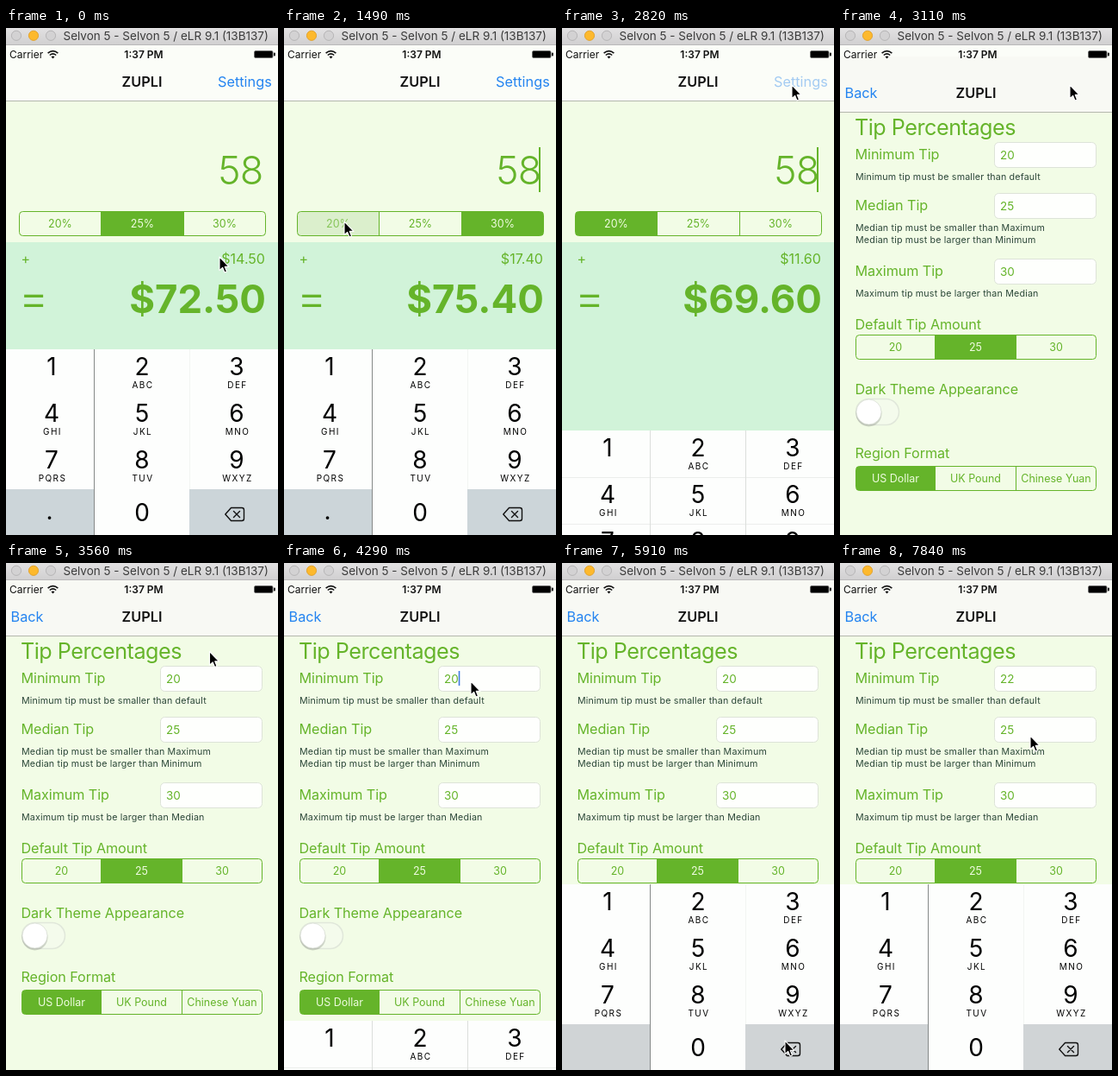
These frames come from a looping animation (316x587 px, 8000 ms). An HTML page:

```html
<!DOCTYPE html>
<html lang="en">
<head>
<meta charset="utf-8">
<title>Tip calculator</title>
<style>
html, body { margin: 0; width: 100%; height: 100%; overflow: hidden; background: #f2fce6; }
svg { display: block; width: 316px; height: 587px; }
text { font-family: Inter, Roboto, sans-serif; white-space: pre; }
</style>
</head>
<body>
<svg id="stage" viewBox="0 0 316 587"></svg>
<script>
const GREEN = '#65b42a', PALE = '#f2fce6', TINT = '#dbefcc', BLUE = '#2484f0', NOTE = '#2b4638';
const LOOP = 8000, STEP = 148;
const stage = document.getElementById('stage');

function el(parent, tag, attrs = {}) {
  const node = document.createElementNS('http://www.w3.org/2000/svg', tag);
  set(node, attrs);
  parent.appendChild(node);
  return node;
}
function set(node, attrs) {
  for (const k in attrs) node.setAttribute(k, attrs[k]);
}
function rect(parent, x, y, width, height, fill, more) {
  return el(parent, 'rect', { x, y, width, height, fill, ...more });
}
function text(parent, x, y, size, str, fill = '#000', more) {
  const node = el(parent, 'text', { x, y, 'font-size': size, fill, ...more });
  node.textContent = str;
  return node;
}
const mid = { 'text-anchor': 'middle' };
const end = { 'text-anchor': 'end' };

// Segmented control; edges are the four vertical borders
let clips = 0;
function segments(parent, edges, y, labels) {
  const box = { x: edges[0], y, width: edges[3] - edges[0], height: 28, rx: 4 };
  const id = 'clip' + clips++;
  el(el(parent, 'clipPath', { id }), 'rect', box);
  const inner = el(parent, 'g', { 'clip-path': `url(#${id})` });
  const cells = labels.map((str, i) => {
    const w = edges[i + 1] - edges[i];
    return {
      back: rect(inner, edges[i], y, w, 28, 'none'),
      label: text(parent, edges[i] + w / 2, y + 18.6, 12.5, str, GREEN, mid)
    };
  });
  el(parent, 'rect', { ...box, fill: 'none', stroke: GREEN });
  el(parent, 'path', { d: `M${edges[1]} ${y}v28M${edges[2]} ${y}v28`, stroke: GREEN });
  return (chosen, pressed) => cells.forEach(({ back, label }, i) => {
    set(back, { fill: i === chosen ? GREEN : i === pressed ? TINT : 'none' });
    set(label, { fill: i === chosen ? '#eefbdf' : i === pressed ? '#86c558' : GREEN });
  });
}

function navBar(parent, fill) {
  rect(parent, 0, 20, 316, 64, fill);
  rect(parent, 0, 84, 316, 1, '#b4b7ae');
  text(parent, 158, 68, 16.3, 'ZUPLI', '#111', { ...mid, 'font-weight': 600 });
}

// Calculator screen
const calc = el(stage, 'g');
rect(calc, 0, 20, 316, 228, PALE);
rect(calc, 0, 248, 316, 339, '#d1f3d9');
navBar(calc, '#fbfdf8');
const settings = text(calc, 246, 68, 16.3, 'Settings', BLUE);
text(calc, 298.5, 181, 45, '58', GREEN, { ...end, 'letter-spacing': -0.8, 'font-weight': 360 });
const caret = rect(calc, 296, 138, 2, 52, GREEN);
const pickTip = segments(calc, [15.5, 110.5, 206.5, 301.5], 212.5, ['20%', '25%', '30%']);
text(calc, 17.5, 273, 16, '+', GREEN);
text(calc, 14.5, 331, 54, '=', GREEN, { 'font-weight': 350 });
const tip = text(calc, 301, 272.5, 16.1, '', GREEN, end);
const total = text(calc, 302, 330, 45.5, '', GREEN, { ...end, 'font-weight': 700 });

// Settings screen
const prefs = el(stage, 'g');
rect(prefs, 0, 20, 316, 567, PALE);
navBar(prefs, '#f8f9f4');
text(prefs, 5.5, 68, 16.3, 'Back', BLUE);
text(prefs, 17, 110.5, 25.2, 'Tip Percentages', GREEN, { 'font-weight': 380, 'letter-spacing': -0.5 });

function heading(y, str) {
  text(prefs, 17.5, y, 16.2, str, GREEN, { 'letter-spacing': -0.08 });
}
function note(y, str) {
  text(prefs, 18, y, 10.7, str, NOTE, { 'letter-spacing': 0.17 });
}
function field(y, name, value, ...notes) {
  heading(y + 20, name);
  rect(prefs, 179.5, y + .5, 118, 29, '#fefffd', { rx: 5, stroke: '#dde3d8' });
  notes.forEach((str, i) => note(y + 44 + i * 14, str));
  return text(prefs, 186, y + 19.5, 13.5, value, GREEN);
}
const least = field(119, 'Minimum Tip', '20', 'Minimum tip must be smaller than default');
field(178, 'Median Tip', '25', 'Median tip must be smaller than Maximum', 'Median tip must be larger than Minimum');
field(254, 'Maximum Tip', '30', 'Maximum tip must be larger than Median');
const fieldCaret = rect(prefs, 202, 125, 1.6, 17, '#3f78e0');
heading(335.5, 'Default Tip Amount');
const thirds = [18.5, 110.5, 204.5, 297.5];
segments(prefs, thirds, 342.5, ['20', '25', '30'])(1);
heading(410.5, 'Dark Theme Appearance');
rect(prefs, 18.5, 416.5, 50, 30, '#f4fbec', { rx: 15, stroke: '#e0e7da', 'stroke-width': 1.5 });
el(prefs, 'circle', { cx: 33.5, cy: 433.5, r: 15, fill: '#000', opacity: .16 });
el(prefs, 'circle', { cx: 33.5, cy: 431.5, r: 14.5, fill: '#fff', stroke: '#d5dad0', 'stroke-width': .7 });
heading(484.5, 'Region Format');
segments(prefs, thirds, 494.5, ['US Dollar', 'UK Pound', 'Chinese Yuan'])(0);

// Number pad
const pad = el(stage, 'g');
rect(pad, 0, 372, 316, 215, '#fdfefd');
const sides = [rect(pad, 0, 534, 102, 53), rect(pad, 213, 534, 103, 53)];
const rows = el(pad, 'path', { d: 'M0 426.5H316M0 480.5H316M0 533.5H316', stroke: '#eceeec' });
const seams = [rect(pad, 102, 372, 1, 215), rect(pad, 213, 372, 1, 162)];
const letters = ['', 'ABC', 'DEF', 'GHI', 'JKL', 'MNO', 'PQRS', 'TUV', 'WXYZ'];
const cols = [53, 158, 268];
letters.forEach((str, i) => {
  const x = cols[i % 3], y = 402 + 54 * Math.floor(i / 3);
  text(pad, x, y, 28, i + 1, '#000', mid);
  text(pad, x + 1, y + 15, 10, str, '#000', { ...mid, 'letter-spacing': 1.4 });
});
text(pad, 158, 571, 28, '0', '#000', mid);
const dot = text(pad, 50.5, 569, 28, '.', '#000', mid);
el(pad, 'path', {
  d: 'M261.5 555.5H274Q276.5 555.5 276.5 558V568Q276.5 570.5 274 570.5H261.5L254.8 563ZM264.5 559.5l7 7M271.5 559.5l-7 7',
  fill: 'none', stroke: '#111', 'stroke-width': 1.4, 'stroke-linejoin': 'round', 'stroke-linecap': 'round'
});

// Status bar
text(stage, 4, 34.5, 12, 'Carrier', '#111');
text(stage, 160, 34.5, 12, '1:37 PM', '#111', { ...mid, 'font-weight': 600 });
el(stage, 'path', {
  d: 'M48.6 29.2Q54.5 24.2 60.4 29.2M50.8 31.5Q54.5 28.3 58.2 31.5',
  fill: 'none', stroke: '#111', 'stroke-width': 1.6
});
el(stage, 'path', { d: 'M52.5 33.2Q54.5 31.6 56.5 33.2L54.5 35.4Z', fill: '#111' });
rect(stage, 288.5, 26.5, 21.5, 8, '#000', { rx: 1.5, stroke: '#666', 'stroke-width': .8 });
rect(stage, 311, 28.5, 1.8, 4, '#000', { rx: .8 });

// Window title bar
const fade = el(stage, 'linearGradient', { id: 'chrome', x2: 0, y2: 1 });
el(fade, 'stop', { 'stop-color': '#e2e1e2' });
el(fade, 'stop', { offset: 1, 'stop-color': '#d0cfd0' });
rect(stage, 0, 0, 316, 20, 'url(#chrome)');
rect(stage, 0, 19, 316, 1, '#b9b8b9');
[['#d3d2d3', '#b3b2b3'], ['#fdb92d', '#e0a02a'], ['#d3d2d3', '#b3b2b3']].forEach(([fill, stroke], i) =>
  el(stage, 'circle', { cx: 12 + 20 * i, cy: 8.8, r: 5.6, fill, stroke, 'stroke-width': .9 }));
text(stage, 66.5, 14, 13.5, 'Selvon 5 - Selvon 5 / eLR 9.1 (13B137)', '#3c3c3c');

const pointer = el(stage, 'path', {
  d: 'M0 0V15.6L3.6 12.3L6 18L8.5 17L6.2 11.4H11Z',
  fill: '#000', stroke: '#fff', 'stroke-width': 1.1, 'stroke-linejoin': 'round'
});

// Pointer stops: step, x, y
const path = [
  [0, 248, 265], [1, 248, 260], [3, 252, 228], [5, 252, 228], [8, 89, 224], [9, 71, 224],
  [10, 70, 224], [12, 70, 224], [14, 180, 130], [16, 257, 71], [17, 267, 66], [22, 267, 66],
  [26, 206, 139], [27, 217, 137], [30, 217, 137], [34, 174, 390], [36, 174, 390],
  [40, 259, 553], [42, 259, 553], [46, 174, 391], [49, 174, 391], [53, 221, 200]
];
// Values held from a step onward
const padDrop = [[0, 0], [19, 94], [20, 215], [29, 158], [30, 36], [31, 3], [32, 0]];
const prefsDrop = [[0, 600], [20, 150], [21, 13], [22, 1], [23, 0]];
const typed = [[0, '20'], [36, '202'], [40, '20'], [42, '2'], [48, '22']];
const choices = [[0, 1], [4, 2], [11, 0]];
const presses = [[0, -1], [3, 2], [4, -1], [10, 0], [11, -1]];
const rates = [20, 25, 30];

const held = (table, n) => table.filter(row => row[0] <= n).pop()[1];

function along(n) {
  const i = path.findIndex(p => p[0] >= n);
  if (i < 1) return path[0].slice(1);
  const [n0, x0, y0] = path[i - 1], [n1, x1, y1] = path[i];
  const k = (n - n0) / (n1 - n0);
  return [x0 + (x1 - x0) * k, y0 + (y1 - y0) * k];
}
const show = (node, on) => set(node, { visibility: on ? 'visible' : 'hidden' });

let last = -1;
function draw(ms) {
  const n = Math.min(53, Math.floor((ms + 12) / STEP));
  if (n === last) return;
  last = n;

  const choice = held(choices, n), amount = 58 * rates[choice] / 100;
  pickTip(choice, held(presses, n));
  tip.textContent = '$' + amount.toFixed(2);
  total.textContent = '$' + (58 + amount).toFixed(2);
  show(caret, (n + 5) % 7 < 4);
  set(settings, { fill: n === 19 ? '#a3cbf2' : BLUE });

  set(prefs, { transform: `translate(0 ${held(prefsDrop, n)})` });
  least.textContent = held(typed, n);
  set(fieldCaret, { x: 186 + least.getComputedTextLength() });
  show(fieldCaret, n >= 29 && (n - 29) % 7 < 3);

  const drop = held(padDrop, n), late = n > 25;
  set(pad, { transform: `translate(0 ${drop})` });
  sides.forEach(side => set(side, { fill: late ? '#d0d4d6' : '#ccd5d9' }));
  set(seams[0], { fill: drop ? '#dcdedc' : '#858988' });
  set(seams[1], { fill: drop ? '#dcdedc' : '#f3f5f3' });
  show(rows, drop > 0);
  show(dot, !late);

  set(pointer, { transform: `translate(${along(n).join(' ')})` });
}

const start = performance.now();
function tick() {
  draw((performance.now() - start) % LOOP);
  requestAnimationFrame(tick);
}
draw(0);
tick();
</script>
</body>
</html>
```
